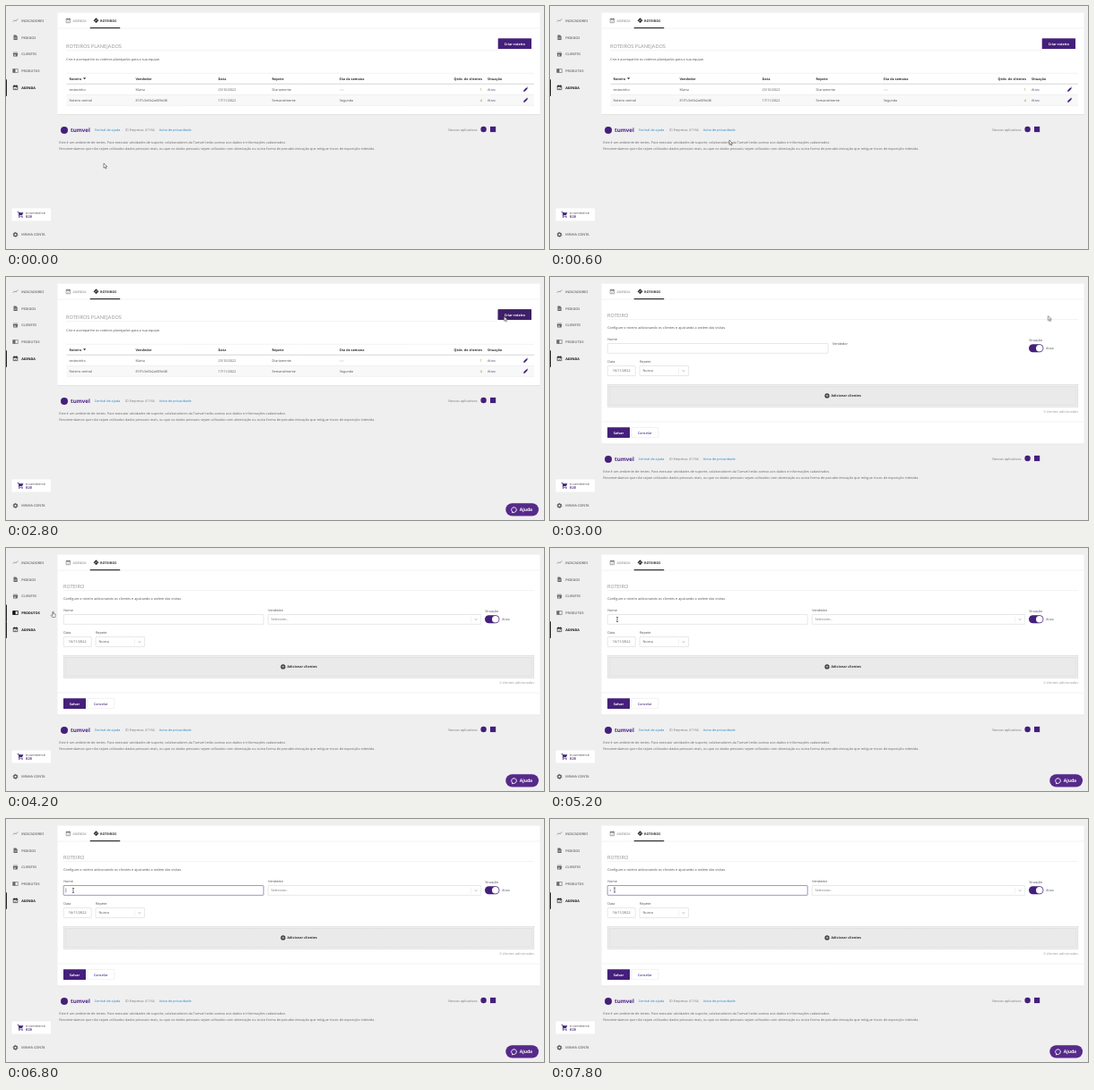
An HTML page that plays this animation: 600 px wide and 272 px high, repeating every 8000 ms.

```html
<!DOCTYPE html>
<html lang="pt-BR">
<head>
<meta charset="utf-8">
<title>Roteiros</title>
<style>
html, body { margin: 0; width: 100%; height: 100%; overflow: hidden; background: #f0eff0; }
svg { display: block; width: 100%; height: 100%; }
text { font: 3.75px "Open Sans", sans-serif; fill: #505050; text-rendering: geometricPrecision; white-space: pre; }
.bold, .bold text { font-weight: 700; fill: #333; }
.nav text { font-weight: 600; fill: #666; }
.nav .on { font-weight: 700; fill: #111; }
.title { font-size: 5.625px; fill: #929292; }
.muted { fill: #999; }
.link { fill: #2387c6; }
.white { font-weight: 700; fill: #fff; }
.end { text-anchor: end; }
.mid { text-anchor: middle; }
.purple { fill: #44207a; }
.rule { stroke: #dcdcdc; stroke-width: .35; fill: none; }
.field { fill: #fff; stroke: #c4c4c4; stroke-width: .4; }
.line { fill: none; stroke: #777; stroke-width: .7; }

/* The screen refreshes in hard steps of 200 ms (2.5%). */
.anim { animation: 8s step-end infinite; }
.list { animation-name: list; }
.form { animation-name: form; }
.footer { animation-name: footer; }
.help { animation-name: help; }
.loading { animation-name: loading; }
.ready { animation-name: ready; }
.press { animation-name: press; }
.hover { animation-name: hover; }
.focus { animation-name: focus; }
.caret { animation-name: caret; }
.typed { animation-name: typed; }
.pointer { animation-name: pointer; }
.arrow { animation-name: arrow; }
.hand { animation-name: hand; }
.beam { animation-name: beam; }

@keyframes list { 0% { opacity: 1 } 37.5%, 100% { opacity: 0 } }
@keyframes form { 0% { opacity: 0 } 37.5%, 100% { opacity: 1 } }
@keyframes footer { 0% { transform: translateY(0) } 37.5%, 100% { transform: translateY(65px) } }
@keyframes help { 0%, 37.5% { opacity: 0 } 10%, 47.5%, 100% { opacity: 1 } }
@keyframes loading { 0%, 42.5%, 100% { opacity: 0 } 37.5% { opacity: 1 } }
@keyframes ready { 0% { opacity: 0 } 42.5%, 100% { opacity: 1 } }
@keyframes press { 0%, 37.5%, 100% { opacity: 0 } 30% { opacity: 1 } }
@keyframes hover { 0%, 62.5%, 100% { opacity: 0 } 52.5% { opacity: 1 } }
@keyframes focus { 0% { opacity: 0 } 70%, 100% { opacity: 1 } }
@keyframes caret { 0%, 75%, 87.5%, 100% { opacity: 0 } 70%, 82.5% { opacity: 1 } }
@keyframes typed { 0% { opacity: 0 } 92.5%, 100% { opacity: 1 } }
@keyframes arrow { 0%, 62.5% { opacity: 1 } 52.5%, 65%, 100% { opacity: 0 } }
@keyframes hand { 0%, 62.5%, 100% { opacity: 0 } 52.5% { opacity: 1 } }
@keyframes beam { 0% { opacity: 0 } 65%, 100% { opacity: 1 } }
@keyframes pointer {
  0% { transform: translate(109px, 176px) }
  5% { transform: translate(130px, 170px) }
  7.5% { transform: translate(200px, 150px) }
  10% { transform: translate(330px, 118px) }
  12.5% { transform: translate(440px, 88px) }
  15% { transform: translate(505px, 72px) }
  17.5% { transform: translate(521px, 69px) }
  25% { transform: translate(530px, 60px) }
  27.5% { transform: translate(545px, 50px) }
  30% { transform: translate(555.5px, 44px) }
  37.5% { transform: translate(555.5px, 43.5px) }
  42.5% { transform: translate(500px, 48px) }
  45% { transform: translate(370px, 55px) }
  47.5% { transform: translate(200px, 62px) }
  50% { transform: translate(85px, 69px) }
  52.5% { transform: translate(52.5px, 71px) }
  62.5% { transform: translate(60px, 76px) }
  65% { transform: translate(75px, 80px) }
  87.5%, 100% { transform: translate(72px, 79.5px) }
}
</style>
</head>
<body>
<svg viewBox="0 0 600 272" preserveAspectRatio="none">
  <defs>
    <path id="pencil" class="purple" d="M-2.3 2.3V1L.9-2.2 2.2-.9-1 2.3ZM1.3-2.6 1.7-2.9 2.8-1.8 2.5-1.3Z"/>
    <path id="chevron" class="line" d="M-1.3-.6 0 .7 1.3-.6" style="stroke:#999"/>
    <g id="calendar">
      <path d="M-2.3-1.9H2.3V2.4H-2.3Z" fill="none" stroke="currentColor" stroke-width=".6"/>
      <path d="M-2.3-2H2.3V-.8H-2.3ZM-1.6-2.8h.7v1h-.7ZM.9-2.8h.7v1H.9Z" fill="currentColor"/>
      <path d="M-1 .7-.2 1.5 1.3 0" fill="none" stroke="currentColor" stroke-width=".5"/>
    </g>
    <g id="book">
      <path d="M-2.8-2H2.8V2H-2.8Z" fill="none" stroke="currentColor" stroke-width=".6"/>
      <path d="M-2.8-2H0V2H-2.8Z" fill="currentColor"/>
    </g>
  </defs>

  <rect width="600" height="272" fill="#f0eff0"/>

  <g class="nav">
    <path class="line" d="M7.8 17.6 9.6 15.7 10.9 17 13.3 14.4"/>
    <text x="17.2" y="17.7">INDICADORES</text>
    <path d="M8.5 32.6H11.2L12.7 34.1V38H8.5Z" fill="#666"/>
    <path d="M9.4 35.2H11.8M9.4 36.5H11.8" stroke="#f0eff0" stroke-width=".45"/>
    <text x="17.2" y="36.5">PEDIDOS</text>
    <path d="M8 51.8H13V52.5H8ZM7.8 53H13.2V54.4H7.8ZM8.2 54.4H12.8V56.4H8.2Z" fill="#666"/>
    <path d="M9 54.5H11V55.6H9Z" fill="#f0eff0"/>
    <text x="17.2" y="55.2">CLIENTES</text>
    <use href="#book" x="10.5" y="72.5" color="#666"/>
    <text x="17.2" y="73.9">PRODUTOS</text>
    <g class="anim hover">
      <rect x="16" y="70" width="26" height="6" fill="#f0eff0"/>
      <rect y="63.5" width="1" height="18.5" fill="#222"/>
      <use href="#book" x="10.5" y="72.5" color="#111"/>
      <text class="on" x="17.2" y="73.9">PRODUTOS</text>
    </g>
    <rect y="82.3" width="1" height="18.5" fill="#222"/>
    <use href="#calendar" x="10.5" y="91.2" color="#111"/>
    <text class="on" x="17.2" y="92.7">AGENDA</text>
    <circle cx="10.5" cy="255.9" r="1.7" fill="none" stroke="#555" stroke-width="1.3"/>
    <circle cx="10.5" cy="255.9" r="2.5" fill="none" stroke="#555" stroke-width=".8" stroke-dasharray="1.3 1.318"/>
    <text x="17.2" y="257.3">MINHA CONTA</text>
  </g>

  <rect x="6.5" y="226.5" width="43.5" height="14" rx=".6" fill="#fff"/>
  <path class="purple" d="M12.6 230.2H14.2L14.7 231.3H19.4L18 234.1H15.2L14.8 234.8H18.8V235.5H13.8L14.3 233.9 13.7 230.9H12.6Z"/>
  <g class="purple"><circle cx="14.8" cy="236.3" r=".65"/><circle cx="18" cy="236.3" r=".65"/></g>
  <text x="22" y="232.8">e-commerce</text>
  <text x="22" y="237.2" style="font-weight:600;fill:#44207a">B2B</text>

  <g class="anim list">
    <rect x="57.5" y="121" width="538" height=".7" fill="#dedede"/>
    <rect x="57.5" y="7.5" width="538" height="113.5" fill="#fff"/>
    <text class="title" x="67" y="47.4">ROTEIROS PLANEJADOS</text>
    <path class="rule" d="M67 49.5H548"/>
    <rect class="purple" x="548.7" y="36.3" width="37.3" height="11.8" rx=".4"/>
    <rect class="anim press" x="548.7" y="36.3" width="37.3" height="11.8" rx=".4" fill="#3d2066"/>
    <text class="white mid" x="567.2" y="43.6">Criar roteiro</text>
    <text x="67.3" y="60.7">Crie e acompanhe os roteiros planejados para a sua equipe.</text>

    <rect x="67.5" y="99.3" width="521.5" height="12" fill="#f8f8f8"/>
    <path class="rule" d="M67.5 75.3H589M67.5 99.3H589M67.5 111.3H589"/>
    <path class="rule" d="M67.5 87.2H589" style="stroke:#aaa;stroke-width:.5"/>
    <g class="bold">
      <text x="70.5" y="82.5">Roteiro</text>
      <path d="M86 80.2H89.2L87.6 82.2Z" fill="#333"/>
      <text x="144.5" y="82.5">Vendedor</text>
      <text x="236.5" y="82.5">Data</text>
      <text x="296.5" y="82.5">Repete</text>
      <text x="372" y="82.5">Dia da semana</text>
      <text class="end" x="531" y="82.5">Qtde. de clientes</text>
      <text x="537" y="82.5">Situação</text>
    </g>
    <text x="70.5" y="94.5">testezinho</text>
    <text x="144.5" y="94.5">Marta</text>
    <text x="236.5" y="94.5">25/10/2022</text>
    <text x="296.5" y="94.5">Diariamente</text>
    <text x="372" y="94.5">----</text>
    <text class="end" x="531" y="94.5" style="fill:#6d8030">1</text>
    <text x="537" y="94.5" style="fill:#44447a">Ativo</text>
    <use href="#pencil" x="579.5" y="93.4"/>
    <text x="70.5" y="106.6">Roteiro central</text>
    <text x="144.5" y="106.6">81f7c3e5b2a609d48</text>
    <text x="236.5" y="106.6">17/11/2022</text>
    <text x="296.5" y="106.6">Semanalmente</text>
    <text x="372" y="106.6">Segunda</text>
    <text class="end" x="531" y="106.6" style="fill:#6d8030">4</text>
    <text x="537" y="106.6" style="fill:#44447a">Ativo</text>
    <use href="#pencil" x="579.5" y="105.5"/>
  </g>

  <g class="anim form">
    <rect x="57.5" y="186.5" width="538" height=".7" fill="#dedede"/>
    <rect x="57.5" y="7.5" width="538" height="179" fill="#fff"/>
    <text class="title" x="64" y="45.2">ROTEIRO</text>
    <path class="rule" d="M64 47.6H589"/>
    <text x="64.2" y="58.3">Configure o roteiro adicionando os clientes e ajustando a ordem das visitas.</text>
    <text x="64.2" y="70.8">Nome</text>

    <g class="anim loading">
      <rect class="field" x="64.2" y="74.5" width="246" height="10.8" rx=".5"/>
      <text x="315" y="76.4">Vendedor</text>
    </g>
    <g class="anim ready">
      <rect class="field" x="64.2" y="74.5" width="223" height="10.8" rx=".5"/>
      <text x="292.3" y="70.8">Vendedor</text>
      <rect class="field" x="292.3" y="74.5" width="237.5" height="10.8" rx=".5"/>
      <text x="295.5" y="81.2" style="fill:#777">Selecione...</text>
      <path class="rule" d="M518.7 76.6V83.2"/>
      <use href="#chevron" x="524.2" y="80"/>
    </g>
    <rect class="anim focus" x="64.2" y="74.5" width="223" height="10.8" rx=".6" fill="#fff" stroke="#6f5aa8" stroke-width=".6"/>
    <rect class="anim caret" x="66.7" y="77.4" width=".45" height="5" fill="#222"/>
    <text class="anim typed" x="66.6" y="81.2">s</text>

    <text x="534.3" y="71.6">Situação</text>
    <rect class="purple" x="534" y="75.2" width="16.4" height="9" rx="4.5"/>
    <circle cx="545.8" cy="79.7" r="3.8" fill="#fff"/>
    <text x="553" y="81.1">Ativa</text>

    <text x="64.2" y="96">Data</text>
    <rect class="field" x="64.2" y="99.5" width="31" height="11" rx=".5"/>
    <text class="mid" x="79.6" y="106.4">16/11/2022</text>
    <text x="100" y="96">Repete</text>
    <rect class="field" x="100" y="99.5" width="54.6" height="11" rx=".5"/>
    <text x="103.5" y="106.4">Nunca</text>
    <path class="rule" d="M143.4 101.6V108.4"/>
    <use href="#chevron" x="149" y="105"/>

    <rect x="64.3" y="120.5" width="524.6" height="25" fill="#f0f0f0" stroke="#c6c6c6" stroke-width=".4"/>
    <rect x="66.3" y="122.5" width="520.6" height="21" fill="#eaeaea" stroke="#bbb" stroke-width=".4" stroke-dasharray="1 .8"/>
    <circle cx="309" cy="132.9" r="2.6" fill="#333"/>
    <path d="M307.5 132.9H310.5M309 131.4V134.4" stroke="#fff" stroke-width=".6"/>
    <text class="bold" x="313.4" y="134.3">Adicionar clientes</text>
    <text class="muted end" x="589" y="151.9">0 clientes adicionados</text>

    <path class="rule" d="M57.5 162H595.5"/>
    <rect class="purple" x="64" y="168.2" width="25" height="11.8" rx=".4"/>
    <text class="white mid" x="76.5" y="175.6">Salvar</text>
    <rect class="field" x="91" y="168.4" width="29.8" height="11.4" rx=".6" style="stroke:#ddd"/>
    <text class="mid" x="105.8" y="175.6" style="font-weight:600;fill:#5a3f8c">Cancelar</text>
  </g>

  <path class="rule" d="M57.5 25H595.5"/>
  <use href="#calendar" x="69.4" y="16.3" color="#777"/>
  <text x="74.4" y="17.8" style="fill:#777">AGENDA</text>
  <path d="M100.5 13.3 103.4 16.2 100.5 19.1 97.6 16.2Z" fill="#222"/>
  <path d="M99.5 17.3V16H101.5M100.9 15.2 101.7 16 100.9 16.8" fill="none" stroke="#fff" stroke-width=".45"/>
  <text class="bold" x="105" y="17.8">ROTEIROS</text>
  <rect x="93.7" y="24" width="33.5" height="1.1" fill="#222"/>

  <g class="anim footer">
    <circle class="purple" cx="65" cy="139" r="4"/>
    <text x="72" y="141.2" style="font-size:6.2px;font-weight:700;fill:#4b2383">tumvel</text>
    <text class="link" x="98.7" y="140.4">Central de ajuda</text>
    <text x="133" y="140.4" style="fill:#777">ID Empresa: 41164</text>
    <text class="link" x="170.7" y="140.4">Aviso de privacidade</text>
    <text class="end" x="526.3" y="140.4" style="fill:#777">Nossos aplicativos:</text>
    <circle class="purple" cx="532.6" cy="138" r="3.2"/>
    <rect class="purple" x="540" y="134.9" width="6.2" height="6.2"/>
    <g style="opacity:.85">
      <text x="59.3" y="154.2">Este é um ambiente de testes. Para executar atividades de suporte, colaboradores da Tumvel terão acesso aos dados e informações cadastrados.</text>
      <text x="59.3" y="160.6">Recomendamos que não sejam utilizados dados pessoais reais, ou que os dados pessoais sejam utilizados com abreviação ou outra forma de pseudonimização que mitigue riscos de exposição indevida.</text>
    </g>
  </g>

  <g class="anim help">
    <rect x="557.3" y="253.2" width="36.7" height="14.4" rx="7.2" fill="#562a8a"/>
    <path d="M564.9 262.9A2.8 2.8 0 1 1 566.6 263.4L564.4 263.8Z" fill="none" stroke="#fff" stroke-width=".9"/>
    <text class="white" x="572.7" y="262.3" style="font-size:5px">Ajuda</text>
  </g>

  <g class="anim pointer" stroke-linejoin="round">
    <path class="anim arrow" d="M0 0V5.3L1.2 4.2 2.1 6.1 3 5.7 2.2 3.8H3.8Z" fill="#fff" stroke="#222" stroke-width=".5"/>
    <path class="anim hand" d="M-.5.4Q0-.4.5.4V2.4L2.6 3V5L2 6.6H-.8L-2.2 4.2-1.6 3.7-.5 4.6Z" fill="#fff" stroke="#222" stroke-width=".5"/>
    <path class="anim beam" d="M-1.1-2.6H1.1M0-2.6V2.6M-1.1 2.6H1.1" fill="none" stroke="#222" stroke-width=".6"/>
  </g>
</svg>
</body>
</html>
```
